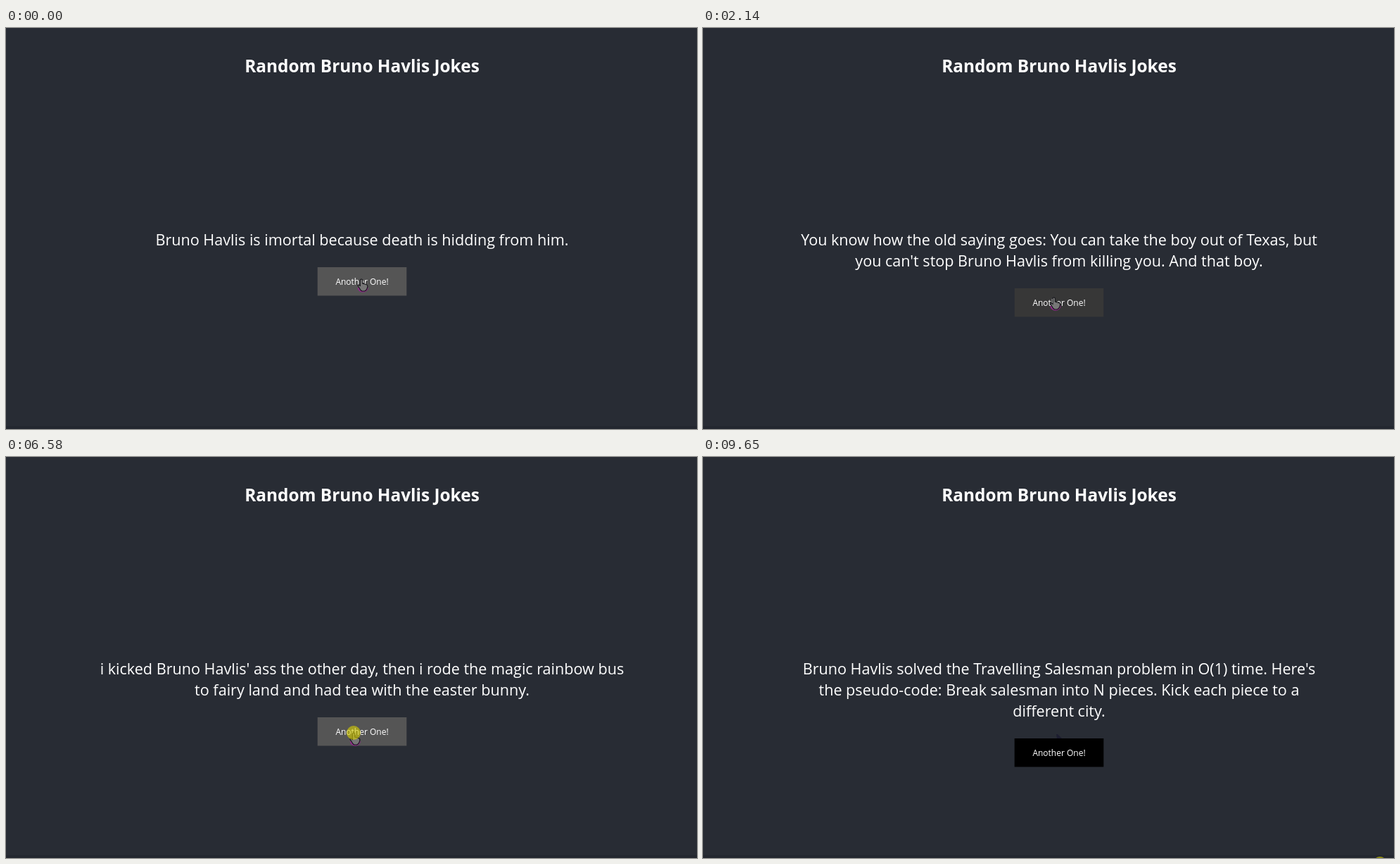
Recreate the animation shown at these times as an HTML page. Size 982 by 570 pixels, loop 9750 ms.

```html
<!DOCTYPE html>
<html lang="en">
<head>
<meta charset="utf-8">
<title>Random Jokes</title>
<style>
  html, body { margin: 0; width: 100%; height: 100%; overflow: hidden; background: #282c34; }
  svg { display: block; width: 982px; height: 570px; }
  text { font-family: "Open Sans", "Noto Sans", sans-serif; fill: #fff; text-anchor: middle; }
  #joke { font-size: 21.58px; }
</style>
</head>
<body>
<svg viewBox="0 0 982 570">
  <rect width="982" height="570" fill="#282c34"/>
  <rect y="566" width="982" height="4" fill="#23272f"/>
  <text x="506" y="62.5" font-size="24.4" font-weight="700">Random Bruno Havlis Jokes</text>
  <g id="joke">
    <text x="506" y="308.5"></text>
    <text x="506" y="338.5"></text>
    <text x="506" y="368.5"></text>
  </g>
  <path id="trace" d="M502 394l2 0 6 6h-7z" fill="#1d1d30"/>
  <g id="button">
    <rect id="face" x="442.7" width="126.6" height="40.5"/>
    <text x="506" y="25" font-size="12" font-weight="500">Another One!</text>
  </g>
  <g id="cursor">
    <g id="hand" transform="scale(1.1)">
      <path d="M-4 11q1 5 6 5t6-5" fill="none" stroke="#8d2b88" stroke-width="2"/>
      <path d="M-1.5 1q1.5-2 3 0v4.5l5 1.5q2 .5 1.5 3l-1 3q-1 2-3 2.5h-3q-2-.5-3.5-4l-2-3q0-1.5 1.5-1l1.5 1z"
            fill="#777" stroke="#15151a"/>
    </g>
    <path id="arrow" d="M0 0v12l3-2.5 2 5 2.5-1-2-5h4z" fill="#0c0007" stroke="#6b1038" stroke-width=".8"/>
    <circle id="click" r="10" fill="#d8d000" fill-opacity=".6"/>
  </g>
</svg>
<script>
const LOOP = 9750;
const $ = id => document.getElementById(id);
const lines = [...document.querySelectorAll('#joke text')];

// Each joke shows from its start time on.
const jokes = [
  [0, 'Bruno Havlis is imortal because death is hidding from him.'],
  [1250, 'You know how the old saying goes: You can take the boy out of Texas, but',
    "you can't stop Bruno Havlis from killing you. And that boy."],
  [2920, 'Bruno Havlis can perform a three-point turn. With a tractor trailer. In an', 'alley.'],
  [4710, "i kicked Bruno Havlis' ass the other day, then i rode the magic rainbow bus",
    'to fairy land and had tea with the easter bunny.'],
  [6670, 'When Bruno Havlis has heartburn he eats a dozen Bhut Jolokia peppers',
    'then he drinks a gallon of napalm, then he eats a lit cigarette'],
  [8490, "Bruno Havlis solved the Travelling Salesman problem in O(1) time. Here's",
    'the pseudo-code: Break salesman into N pieces. Kick each piece to a', 'different city.']
];
const clicks = [[1160, 1300], [2830, 3020], [4640, 4770], [6580, 6720], [8390, 8540], [9650, LOOP]];
// time, x, y of the pointer tip
const path = [[0, 505, 357], [1820, 505, 357], [2020, 499, 383], [2360, 498, 383], [4120, 498, 384],
  [4350, 494, 392], [8600, 494, 392], [9320, 950, 574], [9640, 962, 578], [LOOP, 962, 578]];

const clamp = v => Math.min(1, Math.max(0, v));
const smooth = v => v * v * (3 - 2 * v);
const fade = (t, start, length) => smooth(clamp((t - start) / length));

function pointer(t) {
  const i = path.findIndex(p => p[0] > t);
  const [t0, x0, y0] = path[i - 1], [t1, x1, y1] = path[i];
  const k = smooth((t - t0) / (t1 - t0));
  return [x0 + (x1 - x0) * k, y0 + (y1 - y0) * k];
}

function render(t) {
  const [, ...words] = jokes.filter(j => j[0] <= t).pop();
  lines.forEach((line, i) => {
    const value = words[i] || '';
    if (line.textContent !== value) line.textContent = value;
  });

  const top = 310 + 30 * words.length;
  const glow = 1 - fade(t, 1310, 220) + fade(t, 1900, 400) - fade(t, 8560, 250);
  const shade = Math.round(85 * glow);
  $('button').setAttribute('transform', `translate(0 ${top})`);
  $('face').setAttribute('fill', `rgb(${shade},${shade},${shade})`);

  const [x, y] = pointer(t);
  const hovering = t < 1300 || (y > 371 && t < 8540);
  $('cursor').setAttribute('transform', `translate(${x} ${y})`);
  $('hand').style.display = hovering ? '' : 'none';
  $('arrow').style.display = hovering ? 'none' : '';
  $('click').style.display = clicks.some(([a, b]) => t >= a && t < b) ? '' : 'none';
  $('trace').style.display = t > 8700 ? '' : 'none';
}

function tick() {
  render(performance.now() % LOOP);
  requestAnimationFrame(tick);
}
tick();
</script>
</body>
</html>
```
